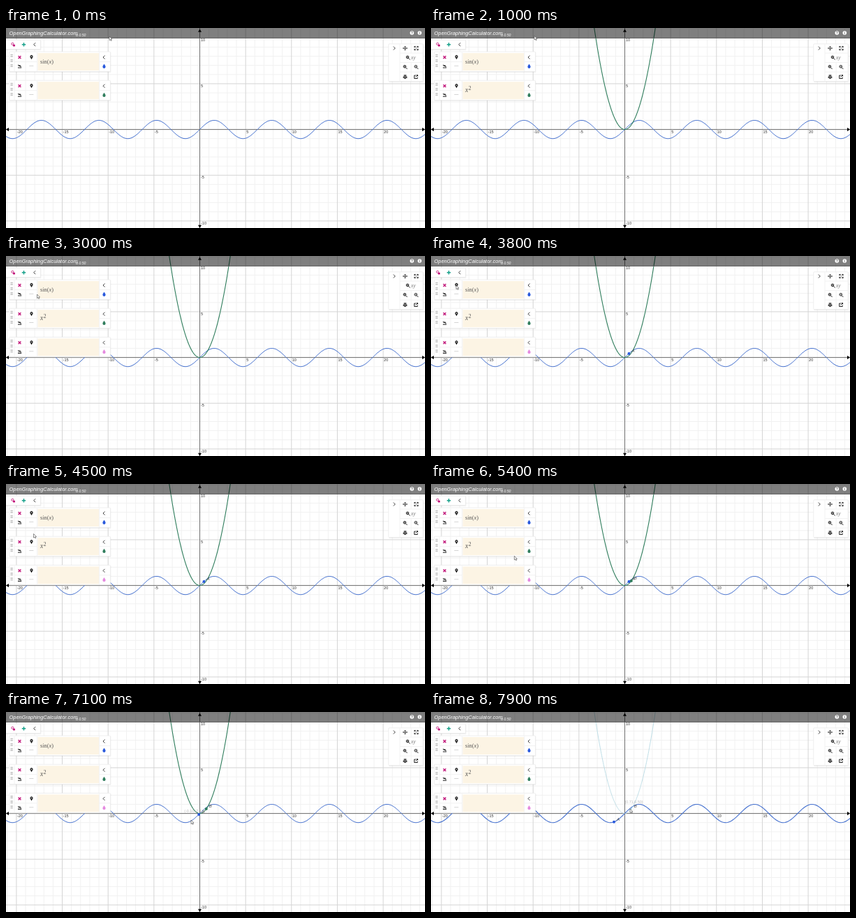
Write an HTML page that moves like this. It is 600 by 287 pixels and loops after 8000 ms.

```html
<!DOCTYPE html>
<html lang="en">
<head>
<meta charset="utf-8">
<title>Graphing calculator</title>
<style>
  html, body { margin: 0; width: 100%; height: 100%; overflow: hidden; background: #fff; }
  svg { display: block; width: 600px; height: 287px; }
  text { font-family: "Liberation Sans", Arial, sans-serif; }
  .tick { font-size: 5.5px; fill: #333; }
  .math { font: 9.6px "Liberation Serif", "Noto Serif", serif; fill: #555; }
  .it { font-style: italic; }
  .card { fill: #fff; stroke: #e9e9e9; stroke-width: .7; }
  .shade { fill: #000; opacity: .06; }
  .field { fill: #fcf4e4; }
  .icon { fill: none; stroke: #222; stroke-width: .85; }
  .curve { fill: none; }
  .coords { font-size: 5.4px; fill: #bbb; text-anchor: middle; }
</style>
</head>
<body>
<svg id="stage" viewBox="0 0 600 287"></svg>
<script>
const LOOP = 8000, STEP = 100;
const OX = 277.5, OY = 145.6, UNIT = 13.13;
const BLUE = '#4470cf', GREEN = '#2f7d5c', PINK = '#e58be0', PALE = '#b5d8e2';
const stage = document.getElementById('stage');
const px = x => OX + x * UNIT, py = y => OY - y * UNIT;

function add(parent, tag, attrs = {}, text) {
  const el = document.createElementNS('http://www.w3.org/2000/svg', tag);
  for (const k in attrs) el.setAttribute(k, attrs[k]);
  if (text !== undefined) el.textContent = text;
  parent.append(el);
  return el;
}
const group = (parent, x = 0, y = 0) => add(parent, 'g', { transform: `translate(${x} ${y})` });
const set = (el, attrs) => { for (const k in attrs) el.setAttribute(k, attrs[k]); };
const show = (el, on) => el.setAttribute('visibility', on ? 'visible' : 'hidden');

function plot(fn, from, to) {
  let d = '';
  for (let i = 0; i <= 300; i++) {
    const x = from + (to - from) * i / 300;
    d += (i ? 'L' : 'M') + px(x).toFixed(2) + ' ' + py(fn(x)).toFixed(2);
  }
  return d;
}

// Grid and axes
const graph = group(stage);
function gridLines(major) {
  let d = '';
  for (let i = -22; i <= 25; i++) {
    if ((i % 5 === 0) !== major) continue;
    d += `M${px(i)} 0V287`;
    if (Math.abs(i) <= 11) d += `M0 ${py(i)}H600`;
  }
  add(graph, 'path', { d, stroke: major ? '#d4d4d4' : '#f1f1f1', fill: 'none' });
}
gridLines(false);
gridLines(true);
add(graph, 'path', { d: `M0 ${OY}H600M${OX} 0V287`, stroke: '#666', 'stroke-width': .9, fill: 'none' });
add(graph, 'path', {
  d: 'M0 145.6l4-2.6v5.2zM600 145.6l-4-2.6v5.2zM277.5 1.5l-2.5 4.3h5zM277.5 287l-2.5-4.3h5z'
});
for (let n = -20; n <= 20; n += 5) {
  if (!n) continue;
  add(graph, 'text', { x: px(n) + 1, y: 151, class: 'tick' }, n);
  if (Math.abs(n) <= 10) add(graph, 'text', { x: 279, y: py(n) + 5, class: 'tick' }, n);
}

// Curves and points
const sine = add(graph, 'path', { d: plot(Math.sin, -22, 25), class: 'curve', stroke: BLUE });
const line = add(graph, 'path', { d: plot(x => x, -12, 12), class: 'curve', stroke: GREEN });
const parabola = add(graph, 'path', { d: plot(x => x * x, -3.4, 3.4), class: 'curve', stroke: GREEN });
function makePoint(name, color) {
  const g = group(graph);
  const dot = add(g, 'circle', { r: 2, fill: color });
  add(g, 'text', { x: 4, y: -2.2, class: 'it', 'font-size': 6, fill: '#444' }, name);
  return { g, dot };
}
const ptA = makePoint('A', '#2858dc'), ptB = makePoint('B', GREEN);
const coords = add(graph, 'text', { x: 290.5, y: 130.6, class: 'coords' }, '(0.71,0.50)');

// Header
const header = group(stage);
add(header, 'rect', { width: 600, height: 15, opacity: .5 });
add(header, 'rect', { y: 14.2, width: 600, height: .8, fill: '#666' });
add(header, 'text', { x: 4.5, y: 10.3, class: 'it', 'font-size': 7.45, fill: '#fff' }, 'OpenGraphingCalculator.com');
add(header, 'text', { x: 100, y: 11.5, class: 'it', 'font-size': 5.2, fill: '#fff' }, 'α 0.50');
for (const [x, s] of [[581.3, '?'], [592.3, 'i']]) {
  add(header, 'circle', { cx: x, cy: 7, r: 2.8, fill: '#fff' });
  add(header, 'text', { x, y: 8.9, 'text-anchor': 'middle', 'font-size': 5.2, 'font-weight': 'bold', fill: '#666' }, s);
}

// Cards and icons
function card(parent, x, y, w, h) {
  add(parent, 'rect', { x: x + .3, y: y + .8, width: w + .6, height: h + .6, rx: 1, class: 'shade' });
  add(parent, 'rect', { x, y, width: w, height: h, rx: 1, class: 'card' });
}
const icon = (parent, x, y, d, extra = {}) =>
  add(parent, 'path', { d, class: 'icon', transform: `translate(${x} ${y})`, ...extra });
const LEFT = 'M1.2-2.5L-1.3 0L1.2 2.5', RIGHT = 'M-1.2-2.5L1.3 0L-1.2 2.5';
const CROSS = 'M-1.9-1.9L1.9 1.9M1.9-1.9L-1.9 1.9';
const PIN = 'M0 3L-1.6 .4A2.1 2.1 0 1 1 1.6 .4ZM-.7-1a.7.7 0 1 0 1.4 0a.7.7 0 1 0-1.4 0';
const DROP = 'M0-3.2C.6-1.8 2.1-.5 2.1 1A2.1 2.1 0 0 1-2.1 1C-2.1-.5-.6-1.8 0-3.2Z';
const LENS = 'M1-.7A1.8 1.8 0 1 1-2.6-.7A1.8 1.8 0 1 1 1-.7M.5 .7L2.8 3';
const solid = color => ({ style: `fill:${color};stroke:none;fill-rule:evenodd` });
const stroke = color => ({ style: `stroke:${color};stroke-width:1.4` });

function panel(y, color, drawMath) {
  const g = group(stage, 0, y);
  card(g, 4.5, 0, 145, 28.5);
  for (let r = 0; r < 9; r++) for (const x of [6.6, 8.4])
    if (r % 3 < 2) add(g, 'rect', { x, y: 3.6 + r * 2.4, width: 1.3, height: 1.6, fill: '#b0b0b0' });
  add(g, 'path', { d: 'M12 1V28M28 1V28M44.5 1V28M133.5 1V28M12 14.5H44.5M133.5 14.5H149', stroke: '#f2f2f2', fill: 'none' });
  add(g, 'rect', { x: 45.5, y: 2, width: 87.5, height: 25, class: 'field' });
  icon(g, 19.5, 8, CROSS, stroke('#c2187b'));
  icon(g, 36.5, 8, PIN, solid('#222'));
  icon(g, 19.5, 20.7, 'M-2.5 2.3H2.7M-2.2-1.8L-.6-.2L.4-1L2 1.2', { style: 'stroke-width:1.1' });
  for (const x of [34.3, 36.3, 38.3]) add(g, 'circle', { cx: x, cy: 20.3, r: .55, fill: '#999' });
  icon(g, 140.3, 8, LEFT);
  icon(g, 140.5, 20.8, DROP, solid(color));
  const math = drawMath && drawMath(add(g, 'text', { x: 49, y: 17, class: 'math' }));
  const caret = add(g, 'path', { d: 'M49.5 9V18.5', stroke: '#444', 'stroke-width': .9 });
  show(caret, false);
  return { g, math, caret };
}
const tools = group(stage);
card(tools, -1, 17, 50.5, 13.5);
add(tools, 'circle', { cx: 9.4, cy: 22.8, r: 1.6, class: 'icon', style: 'stroke:#c2187b' });
add(tools, 'rect', { x: 10, y: 23.8, width: 3, height: 2.6, fill: '#c2187b' });
icon(tools, 25.5, 23.7, 'M-2.7 0H2.7M0-2.7V2.7', stroke('#16a08a'));
icon(tools, 41, 23.7, LEFT);

panel(34, '#2858dc', t => {
  set(t, { style: 'font-size:8.3px' });
  add(t, 'tspan', {}, 'sin(');
  add(t, 'tspan', { class: 'it' }, 'x');
  add(t, 'tspan', {}, ')');
});
const second = panel(75.2, GREEN, t => {
  const base = add(t, 'tspan', { class: 'it' }, 'x');
  const power = add(t, 'tspan', { dx: .4, dy: -3.2, 'font-size': 7.6 }, '2');
  return { base, power };
});
const third = panel(116.4, PINK);

// View controls
const view = group(stage);
card(view, 547.8, 22.8, 49.5, 53.8);
add(view, 'path', { d: 'M564 23V76M564 36H597M564 49.5H597M564 63H597M580 23V36M580 50V76', stroke: '#f2f2f2', fill: 'none' });
icon(view, 556, 29, RIGHT);
icon(view, 571.5, 29, 'M-2.8 0H2.8M0-2.8V2.8M-1-2L0-3L1-2M-1 2L0 3L1 2M-2-1L-3 0L-2 1M2-1L3 0L2 1', { style: 'stroke-width:.8' });
icon(view, 587.5, 29, 'M-.7-.7L-2.6-2.6M-2.6-.8V-2.6H-.8M.7-.7L2.6-2.6M.8-2.6H2.6V-.8M-.7 .7L-2.6 2.6M-2.6 .8V2.6H-.8M.7 .7L2.6 2.6M.8 2.6H2.6V.8', { style: 'stroke-width:.9' });
for (const [x, y, d] of [[575.8, 42.5, 'M-2-.7H.4M-.8-1.9V.5'], [571.8, 56, 'M-2-.7H.4M-.8-1.9V.5'], [587.6, 56, 'M-2-.7H.4']]) {
  icon(view, x, y, LENS, { style: 'stroke-width:1' });
  icon(view, x, y, d, { style: 'stroke-width:.6' });
}
add(view, 'text', { x: 580, y: 45, class: 'math it', style: 'font-size:7.5px;fill:#777' }, 'xy');
icon(view, 571.5, 70, 'M-2.8-.6H2.8V2H1.8V.9H-1.8V2H-2.8ZM-1.8-2.8H1.8V-1.2H-1.8ZM-1.3 1.5H1.3V2.9H-1.3Z', solid('#222'));
icon(view, 587, 70, 'M0-2H-2.3V2.5H2.2V.6M-.4 .5L2.4-2.3M.8-2.5H2.6V-.7', { style: 'stroke-width:1' });

const cursor = add(stage, 'path', {
  d: 'M0 0V5.6L1.4 4.5L2.3 6.4L3.2 6L2.4 4.1H4Z', fill: '#fff', stroke: '#444', 'stroke-width': .6
});

// time, x, y
const MOVES = [
  [0, 148, 12], [1600, 148, 11], [1700, 110, 9], [2200, 40, 9], [2500, 30, 24],
  [2800, 42, 44], [3000, 44.5, 55], [3300, 42, 58], [3600, 38, 46], [3800, 36, 42],
  [4100, 36, 43], [4500, 39.5, 71.5], [4900, 36, 82], [5200, 37, 84],
  [5800, 284, 142], [6000, 284, 143], [6700, 273, 151], [7100, 265, 155],
  [7200, 265, 155], [7600, 262, 157], [7900, 285, 139]
];
const SLIDE = [[0, .45], [6000, .45], [6700, -.1], [7200, -.1], [7600, -1.18]];

function sample(keys, t) {
  let i = keys.length - 1;
  while (i && keys[i][0] > t) i--;
  const a = keys[i], b = keys[i + 1] || a;
  const k = b === a ? 0 : (t - a[0]) / (b[0] - a[0]);
  return a.slice(1).map((v, n) => v + (b[n + 1] - v) * k);
}
const within = (t, a, b) => t >= a && t < b;

function draw(t) {
  const [cx, cy] = sample(MOVES, t);
  set(cursor, { transform: `translate(${cx} ${cy})` });
  show(cursor, !within(t, 1800, 2200));

  show(second.math.base, t >= 600);
  show(second.math.power, t >= 800);
  show(second.caret, within(t, 300, 600));
  show(third.g, t >= 1300);
  show(third.caret, within(t, 1300, 3600) && (t - 1300) % 1000 < 650);
  show(line, within(t, 700, 1000));
  show(parabola, t >= 1000);

  const focus = within(t, 5900, 6800) || t >= 7200;
  set(sine, { 'stroke-width': focus ? 1.1 : 1 });
  set(parabola, { stroke: focus ? PALE : GREEN, 'stroke-width': focus ? .9 : 1.1 });

  const [a] = sample(SLIDE, t);
  set(ptA.g, { transform: `translate(${px(a)} ${py(Math.sin(a))})` });
  set(ptB.g, { transform: `translate(${px(.71)} ${py(.5)})` });
  set(ptB.dot, { fill: focus ? PALE : GREEN, r: focus ? 1.2 : 2 });
  show(ptA.g, t >= 3800);
  show(ptB.g, t >= 5000);

  const released = within(t, 6800, 7200);
  show(coords, focus || released);
  set(coords, released ? { x: 270, y: 143.6 } : { x: 290.5, y: 130.6 });
  coords.textContent = released ? '(-0.10,-0.10)' : '(0.71,0.50)';
}

const start = performance.now();
function tick() {
  const t = (performance.now() - start) % LOOP;
  draw(Math.floor(t / STEP) * STEP);
  requestAnimationFrame(tick);
}
tick();
</script>
</body>
</html>
```
